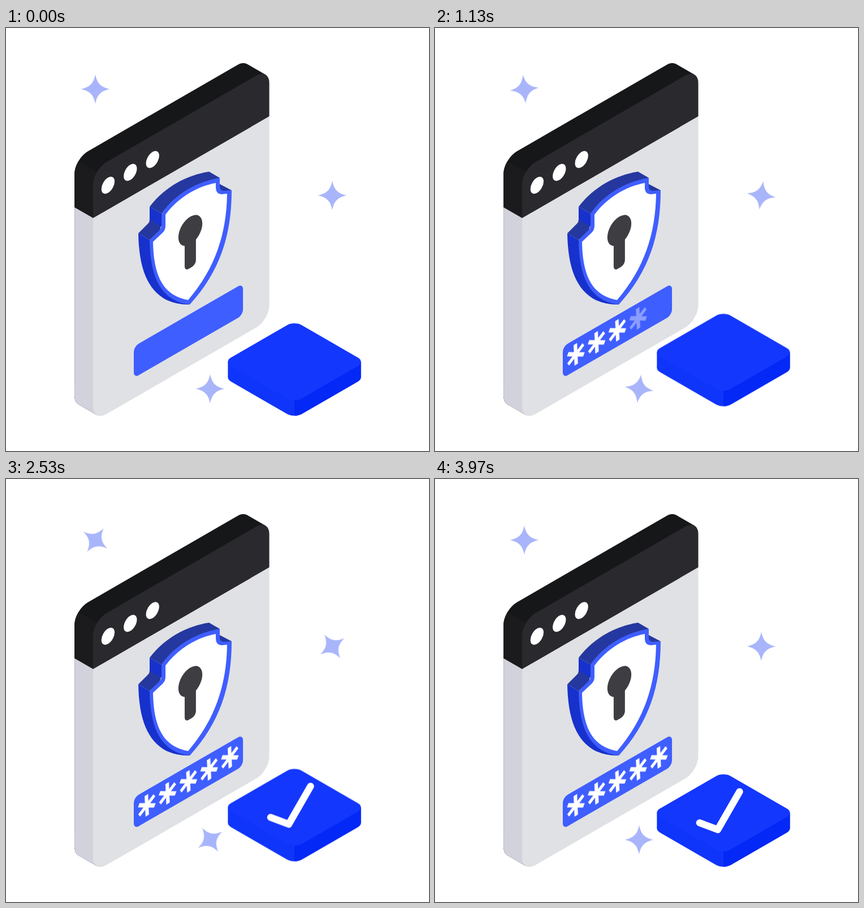
These frames come from a looping animation (748 by 748 pixels, 4 s). An HTML page without scripts:

```html
<!DOCTYPE html>
<html lang="en">
<head>
<meta charset="utf-8">
<title>Password check</title>
<style>
  html, body { margin: 0; width: 100%; height: 100%; overflow: hidden; background: #fff; }
  svg { display: block; width: 100%; height: 100%; }

  .star { fill: #a9b5fb; animation: turn 1s cubic-bezier(.37, 0, .63, 1) infinite alternate; }
  .ccw { --turn: -100deg; }
  .cw { --turn: 102deg; }
  @keyframes turn { to { transform: rotate(var(--turn)); } }

  .tile { animation: bob 1s cubic-bezier(.37, 0, .63, 1) infinite alternate; }
  @keyframes bob { to { transform: translateY(-17.5px); } }

  /* each character fades in over a third of a second */
  .key { animation: 4s linear infinite; }
  .k1 { animation-name: key1; }
  .k2 { animation-name: key2; }
  .k3 { animation-name: key3; }
  .k4 { animation-name: key4; }
  .k5 { animation-name: key5; }
  @keyframes key1 { 0% { opacity: 0; } 8.333%, 100% { opacity: 1; } }
  @keyframes key2 { 0%, 8.333% { opacity: 0; } 16.667%, 100% { opacity: 1; } }
  @keyframes key3 { 0%, 16.667% { opacity: 0; } 25%, 100% { opacity: 1; } }
  @keyframes key4 { 0%, 25% { opacity: 0; } 33.333%, 100% { opacity: 1; } }
  @keyframes key5 { 0%, 33.333% { opacity: 0; } 41.667%, 100% { opacity: 1; } }

  .check {
    fill: none; stroke: #fff; stroke-width: 12.5;
    stroke-linecap: round; stroke-linejoin: round;
    stroke-dasharray: 1 2;
    animation: draw 4s linear infinite;
  }
  @keyframes draw {
    0%, 41.66% { opacity: 0; stroke-dashoffset: 1; }
    41.67% { opacity: 1; stroke-dashoffset: 1; animation-timing-function: cubic-bezier(.37, 0, .63, 1); }
    58.33%, 100% { opacity: 1; stroke-dashoffset: 0; }
  }
</style>
</head>
<body>
<svg viewBox="0 0 748 748">
  <defs>
    <path id="star" d="M0-26C3-10 10-3 26 0C10 3 3 10 0 26C-3 10-10 3-26 0C-10-3-3-10 0-26Z"/>
    <path id="key" d="M0-18.5V18.5M-16-9.25L16 9.25M-16 9.25L16-9.25" transform="rotate(-3)" stroke="#fff" stroke-width="7"/>
    <rect id="slab" width="144.5" height="144.5" rx="15" transform="matrix(.866 .5 -.866 .5 510 517.9)"/>
    <clipPath id="hull">
      <rect x="-38" y="212.7" width="360" height="445.6" rx="27"/>
      <path d="M314.1 220.6L352.1 258.6L7.9 688.4L-30.1 650.4Z"/>
    </clipPath>
    <clipPath id="front"><rect y="250.7" width="360" height="445.6" rx="27"/></clipPath>
    <clipPath id="half"><rect x="510" y="500" width="130" height="200"/></clipPath>
  </defs>

  <!-- window -->
  <g transform="matrix(.866 -.5 0 1 154 0)">
    <g clip-path="url(#hull)">
      <rect x="-50" y="190" width="420" height="520" fill="#151719"/>
      <path d="M-50 200.7L8 258.7L20 336H0L-50 286Z" fill="#1b1b1d"/>
      <path d="M-50 286L0 336H20V720H-50Z" fill="#d2d2dd"/>
    </g>
    <g clip-path="url(#front)">
      <rect y="336" width="360" height="374" fill="#e0e1e4"/>
      <rect y="240" width="360" height="96" fill="#2a292e"/>
    </g>
    <g fill="#fff">
      <circle cx="30.5" cy="293.3" r="13.5"/>
      <circle cx="76" cy="293.3" r="13.5"/>
      <circle cx="121.5" cy="293.3" r="13.5"/>
    </g>
    <rect x="83.1" y="604.7" width="223" height="55.8" rx="10" fill="#3f5eff"/>
    <g transform="translate(109.7 631.9)">
      <g class="key k1"><use href="#key"/></g>
      <g class="key k2"><use href="#key" x="42.4"/></g>
      <g class="key k3"><use href="#key" x="84.8"/></g>
      <g class="key k4"><use href="#key" x="127.2"/></g>
      <g class="key k5"><use href="#key" x="169.6"/></g>
    </g>
  </g>

  <!-- shield -->
  <path d="M234 363C235 425 250 463 284 481Q305 490 325 489L254 375Z" fill="#1731cc"/>
  <path d="M234 363L251 346Q254 343 254 338L275 347L272 358L254 375Z" fill="#2538a0"/>
  <path d="M254 316V339L275 351V328Z" fill="#1731cc"/>
  <path d="M254 316C281 280 321 260 359 254L378 265L340 290L275 328Z" fill="#2538a0"/>
  <path d="M378 276L399 287L385 290L376 284Z" fill="#2538a0"/>
  <path d="M275 328C300 292 340 271 378 265V280Q378 288 385 288L399 287C399 367 378 431 325 489C285 484 255 457 254 375L271 358Q275 354 275 348Z" fill="#3f5eff"/>
  <path d="M282 330C304 300 338 280 371 274V283Q371 293 381 294L391 293C390 364 370 425 322 481C285 474 261 449 260 378L277 362Q282 357 282 350Z" fill="#fff"/>
  <g transform="matrix(.866 -.5 0 1 154 0)" fill="#3d3d42">
    <circle cx="198.6" cy="457.3" r="24.5"/>
    <rect x="187" y="457" width="23" height="66.5" rx="8"/>
  </g>

  <!-- stars -->
  <g transform="translate(158 108)"><use class="star ccw" href="#star"/></g>
  <g transform="translate(577 296)"><use class="star cw" href="#star"/></g>
  <g transform="translate(361 638)"><use class="star cw" href="#star"/></g>

  <!-- tile -->
  <g class="tile">
    <g fill="#1035fa">
      <use href="#slab" y="27.5"/>
      <rect x="392.4" y="590" width="235.2" height="27.5"/>
    </g>
    <g clip-path="url(#half)" fill="#0428f6">
      <use href="#slab" y="27.5"/>
      <rect x="510" y="590" width="117.6" height="27.5"/>
    </g>
    <use href="#slab" fill="#1437fd"/>
    <path class="check" pathLength="1" d="M468 608L500 620L538.5 553"/>
  </g>
</svg>
</body>
</html>
```
